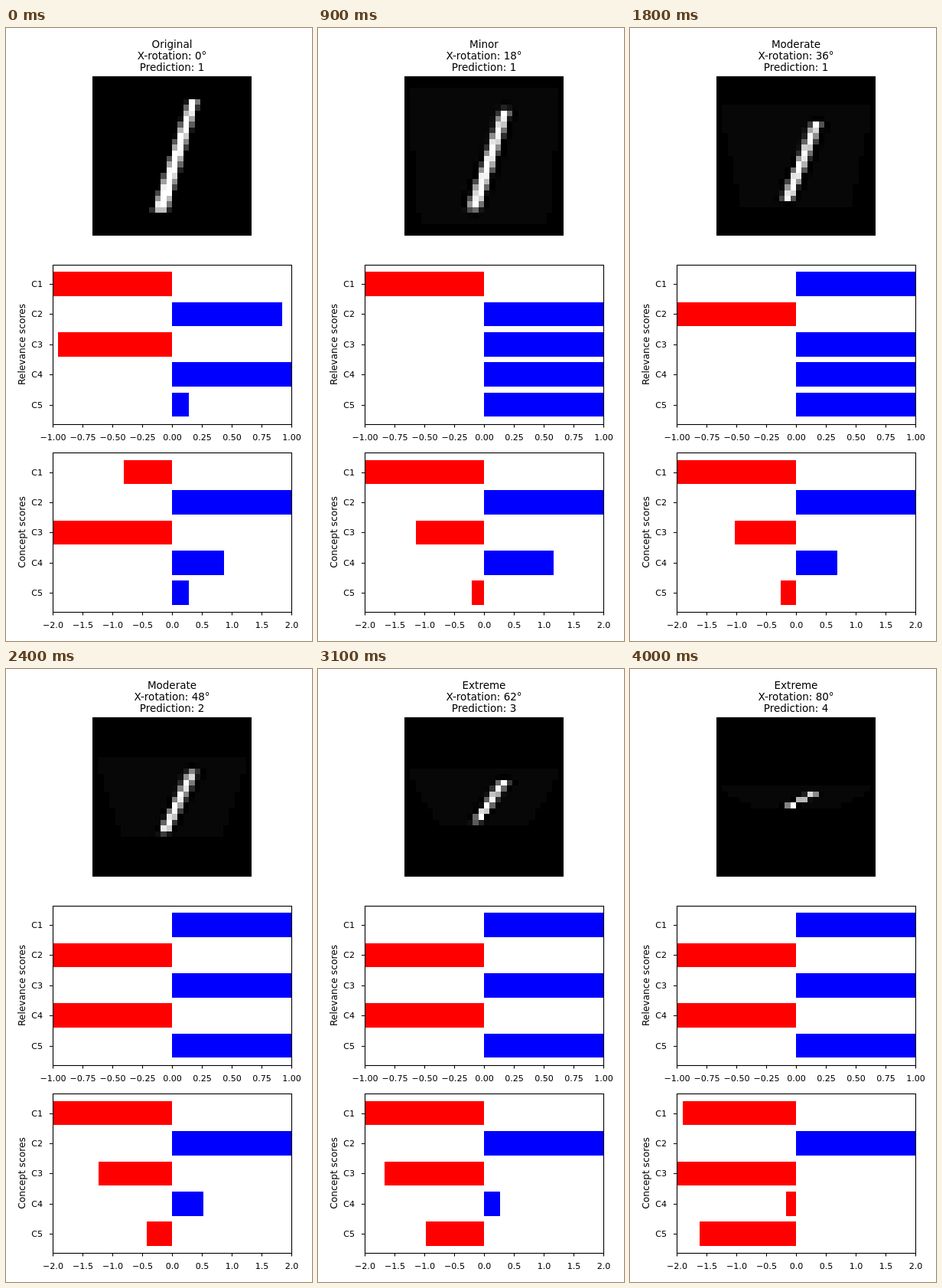
Animation, 400 px wide and 800 px high, one loop 4100 ms. Source, as an HTML page:

```html
<!DOCTYPE html>
<html lang="en">
<head>
<meta charset="utf-8">
<title>Rotation scores</title>
<style>
  html, body { margin: 0; width: 100%; height: 100%; overflow: hidden; background: #fff; }
  svg { display: block; }
  text { font-family: "DejaVu Sans", sans-serif; font-size: 11.1px; fill: #000; }
  .title { font-size: 13.5px; }
  .label { font-size: 12.22px; }
  .line { fill: none; stroke: #000; stroke-width: 1.1px; }
  .bar, .cell { shape-rendering: crispEdges; }
</style>
</head>
<body>
<svg id="stage" width="400" height="800" viewBox="0 0 400 800"></svg>
<script>
const STEP = 100, STEPS = 41, N = 28;
const MODERATE = 16, EXTREME = 31;   // first step of each level
const stage = document.getElementById('stage');

function add(tag, attrs, content) {
  const el = document.createElementNS('http://www.w3.org/2000/svg', tag);
  for (const key in attrs) el.setAttribute(key, attrs[key]);
  if (content) el.textContent = content;
  stage.appendChild(el);
  return el;
}

function label(x, y, content, anchor, extra) {
  return add('text', { x, y, 'text-anchor': anchor, ...extra }, content);
}

const clamp = (v, lo, hi) => Math.max(lo, Math.min(hi, v));
const overlap = (a0, a1, b0, b1) => Math.max(0, Math.min(a1, b1) - Math.max(a0, b0));

/* ---------- the digit ---------- */

// Coverage of one cell by a slanted stroke that widens downward.
function ink(col, row) {
  const i = row - 4, mid = 17.7 - 0.302 * i, half = 0.78 + 0.0225 * i;
  return overlap(col, col + 1, mid - half, mid + half) * overlap(row, row + 1, 4, 23.75);
}

function cubic(d) {
  const a = -0.75;
  d = Math.abs(d);
  if (d < 1) return ((a + 2) * d - (a + 3)) * d * d + 1;
  if (d < 2) return ((a * d - 5 * a) * d + 8 * a) * d - 4 * a;
  return 0;
}

function sample(x, y) {
  const c = Math.floor(x), r = Math.floor(y);
  let sum = 0;
  for (let j = r - 1; j <= r + 2; j++)
    for (let i = c - 1; i <= c + 2; i++)
      sum += ink(i, j) * cubic(x - i) * cubic(y - j);
  return sum;
}

// Tilt about the x axis in perspective, scaled so the near edge keeps its width.
// Returns the brightness of a cell, or null outside the tilted square.
function tilt(deg) {
  if (!deg) return ink;
  const a = deg * Math.PI / 180, q = 14 * Math.sin(a) / 48;
  const ratio = (1 - q) / (1 + q);
  const height = 27.4 * Math.cos(a) * (1 + ratio) / 2, top = 13.7 - height / 2;
  return (col, row) => {
    const f = (row - top) / height;
    const x = 13.5 + (col - 13.5) / (1 - (1 - ratio) * f);
    const y = 27 * f * ratio / (1 - f + f * ratio);
    const inside = f >= 0 && f <= 1 && x >= 0 && x <= 27 && y < 26.3;
    return inside ? sample(x, y) : null;
  };
}

const edge = (from, i) => Math.round(from + i * 208 / N);
add('rect', { x: 113, y: 63, width: 208, height: 208 });
const cells = [];
for (let r = 0; r < N; r++)
  for (let c = 0; c < N; c++) {
    const x = edge(113, c), y = edge(63, r);
    cells.push(add('rect', {
      x, y, width: edge(113, c + 1) - x, height: edge(63, r + 1) - y, class: 'cell'
    }));
  }

function drawDigit(deg) {
  const shade = tilt(deg), base = deg ? 7 : 0;
  const values = cells.map((_, k) => shade(k % N, Math.floor(k / N)));
  const peak = Math.min(1, Math.max(...values));
  cells.forEach((cell, k) => {
    const v = values[k];
    const g = v === null ? 0 : Math.round(clamp(base + v / peak * (255 - base), 0, 255));
    cell.setAttribute('fill', `rgb(${g},${g},${g})`);
  });
}

/* ---------- the charts ---------- */

function relevance(s) {
  if (!s) return [-1, 0.925, -0.955, 1, 0.14];
  const flip = s < MODERATE ? 1 : -1;
  const dip = 0.135 * Math.max(0, 1 - Math.abs(s - 28) / 3);
  return [-flip, flip, 1, s < 22 ? 1 : -1, 1 - dip];
}

function concept(s) {
  if (!s) return [-0.81, 2, -2, 0.87, 0.28];
  const late = Math.max(0, s - 18);
  const early = clamp((18 - s) / 5, 0, 1);
  const drop = s < MODERATE ? 0 : 0.31;
  return [
    -2 + 0.015 * Math.max(0, s - 33.3),
    2,
    -1.03 - 0.11 * early - 0.018 * late - 0.0024 * late * late,
    1.22 - 0.00067 * s * s - drop,
    -0.2 - 1.56 / (1 + Math.exp((31 - s) / 3.9))
  ];
}

function chart(top, name, limit, digits, scores) {
  const unit = 208 / 5.28, y0 = Math.round(top);
  const row = i => Math.round(top + i * unit);
  const bars = scores(0).map((_, i) => add('rect', {
    y: row(i + 0.24), height: row(i + 1.04) - row(i + 0.24), class: 'bar'
  }));
  add('rect', { x: 61.5, y: y0 + 0.5, width: 312, height: 208, class: 'line' });
  for (let k = 0; k <= 8; k++) {
    const x = 61.5 + 39 * k, v = limit * (k - 4) / 4;
    add('path', { d: `M${x} ${y0 + 208.5}v4`, class: 'line' });
    label(x, y0 + 229, (v < 0 ? '\u2212' : '') + Math.abs(v).toFixed(digits), 'middle');
  }
  bars.forEach((_, i) => {
    const y = row(i + 0.64);
    add('path', { d: `M57 ${y + 0.5}h4`, class: 'line' });
    label(48, y + 4, 'C' + (i + 1), 'end');
  });
  const mid = y0 + 104;
  label(25, mid, name, 'middle', { class: 'label', transform: `rotate(-90 25 ${mid})` });

  return s => scores(s).forEach((score, i) => {
    const v = clamp(score, -limit, limit);
    const x = 217 + Math.round(156 * v / limit);
    bars[i].setAttribute('x', Math.min(217, x));
    bars[i].setAttribute('width', Math.abs(x - 217));
    bars[i].setAttribute('fill', v < 0 ? '#f00' : '#00f');
  });
}

const drawRelevance = chart(308.8, 'Relevance scores', 1, 2, relevance);
const drawConcept = chart(554.45, 'Concept scores', 2, 1, concept);

/* ---------- titles and playback ---------- */

const titles = [26, 41, 56].map(y => label(217, y, '', 'middle', { class: 'title' }));

function level(s) {
  if (!s) return 'Original';
  return s < MODERATE ? 'Minor' : s < EXTREME ? 'Moderate' : 'Extreme';
}

function draw(s) {
  const deg = 2 * s;
  const guess = 1 + [22, EXTREME, 37].filter(at => s >= at).length;
  titles[0].textContent = level(s);
  titles[1].textContent = `X-rotation: ${deg}\u00b0`;
  titles[2].textContent = `Prediction: ${guess}`;
  drawDigit(deg);
  drawRelevance(s);
  drawConcept(s);
}

const start = performance.now();
let shown = -1;

function tick() {
  const s = Math.floor((performance.now() - start) / STEP) % STEPS;
  if (s !== shown) draw(shown = s);
  requestAnimationFrame(tick);
}
tick();
</script>
</body>
</html>
```
